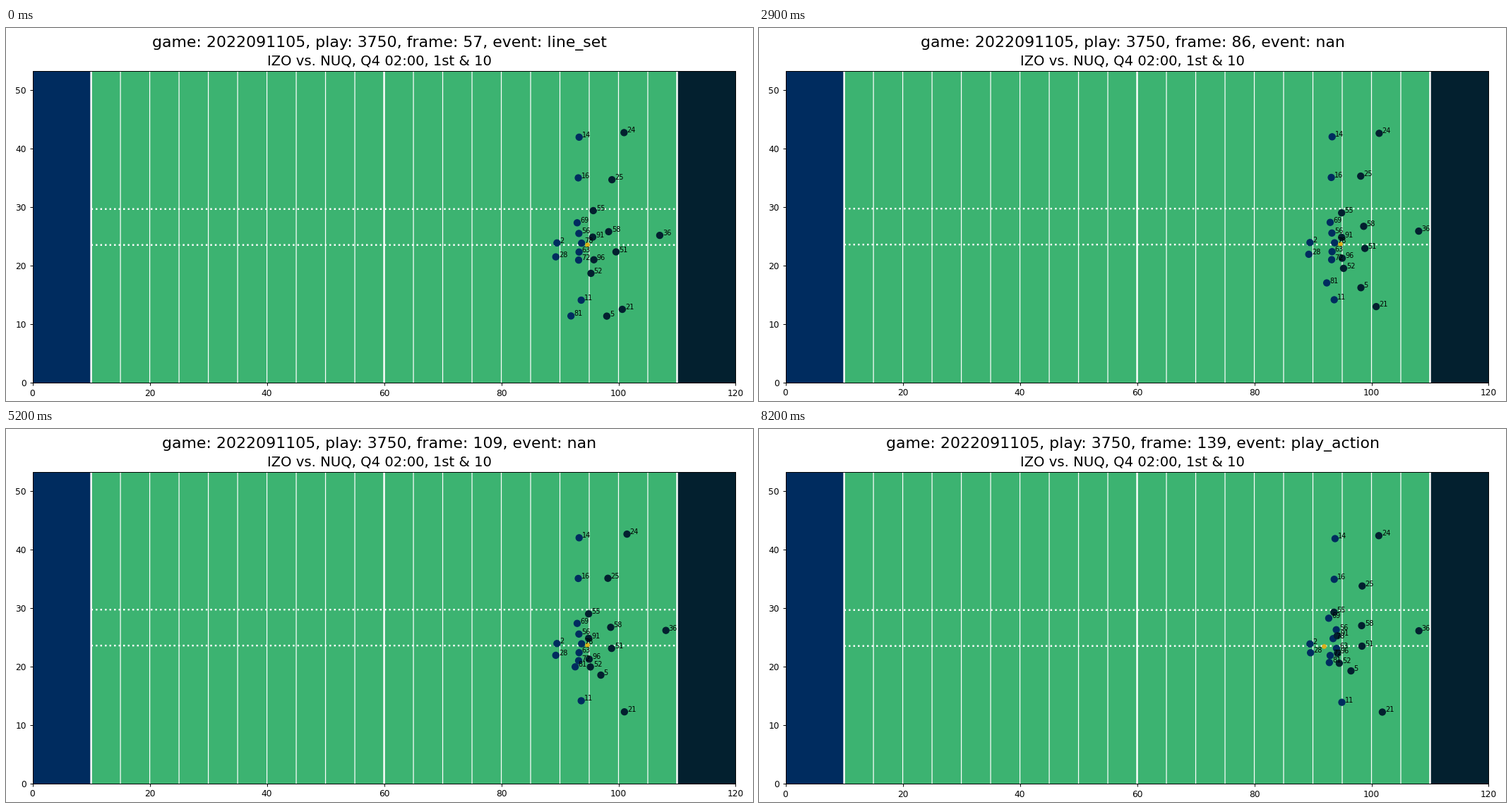
Recreate the animation shown at these times as a matplotlib script. Size 1058 by 529 pixels, loop 8.3 s.

```python
import numpy as np
import matplotlib.pyplot as plt
from matplotlib.animation import FuncAnimation
from matplotlib.patches import Rectangle

W, H = 1058, 529
FRAMES, INTERVAL = 83, 100
FIRST_FRAME = 57
FIELD_LEN, FIELD_WID = 120, 53.3
YARD = 8.299                      # pixels per yard
LEFT = 37.6
HOME, AWAY, GRASS, BALL = "#002c5f", "#03202f", "mediumseagreen", "#dbb01a"
EVENTS = {57: "line_set", 129: "ball_snap", 139: "play_action"}

# Phases of the play in tenths of a second; the loop ends halfway through SNAP.
SETTLE, CREEP, TROT, ADJUST, SNAP = (0, 18), (11, 29), (9, 42), (45, 57), (72, 92)

players = []                      # (number, color, start, moves)


def unit(color, spots, *moves):
    """Players who share the same moves, each move being (phase, dx, dy)."""
    players.extend((num, color, spot, moves) for num, spot in spots.items())


# Offense: tackles and center, guards, receivers, backfield, man in motion
unit(HOME, {69: (92.95, 27.37), 78: (93.70, 23.89), 72: (93.20, 21.00)}, (SNAP, -0.5, 1.9))
unit(HOME, {56: (93.24, 25.55), 63: (93.27, 22.37)}, (SNAP, 1.5, 1.6))
unit(HOME, {14: (93.28, 42.00), 16: (93.14, 35.05)}, (SNAP, 1.0, -0.15))
unit(HOME, {11: (93.64, 14.15)}, (SNAP, 2.6, -0.4))
unit(HOME, {2: (89.50, 23.93)})
unit(HOME, {28: (89.30, 21.55)}, (SETTLE, 0, 0.37), (SNAP, 0.6, 1.0))
unit(HOME, {81: (91.89, 11.45)}, (TROT, 0.72, 8.5), (SNAP, 0.4, 1.6))

# Defense: line, linebackers, secondary, nickel who shadows the motion
unit(AWAY, {55: (95.70, 29.45)}, (CREEP, -0.8, -0.45), (SNAP, -2.6, 0.7))
unit(AWAY, {91: (95.60, 24.92)}, (CREEP, -0.7, -0.1), (SNAP, -1.5, 1.0))
unit(AWAY, {96: (95.80, 21.05)}, (CREEP, -0.8, 0.2), (SNAP, -1.6, 2.2))
unit(AWAY, {52: (95.30, 18.73)}, (TROT, -0.1, 1.2), (SNAP, -1.4, 1.4))
unit(AWAY, {58: (98.32, 25.85)}, (SETTLE, 0.35, 0.85), (SNAP, -0.7, 0.7))
unit(AWAY, {51: (99.57, 22.40)}, (SETTLE, -0.6, 0.2), (TROT, -0.15, 0.5), (SNAP, -0.9, 0.9))
unit(AWAY, {36: (107.04, 25.22)}, (SETTLE, 0.95, 0.1), (TROT, 0.1, 0.85))
unit(AWAY, {24: (100.95, 42.78)}, (SETTLE, 0.1, -0.25), (TROT, 0.4, 0.1), (SNAP, -0.4, -0.4))
unit(AWAY, {25: (98.88, 34.73)}, (SETTLE, -0.72, 0.55), ((45, 75), 0.25, -1.45))
unit(AWAY, {21: (100.65, 12.58)}, (SETTLE, 0.15, 0.4), ((29, 45), -0.35, -0.6),
     (ADJUST, 0.9, -0.2), (SNAP, 1.0, 0.2))
unit(AWAY, {5: (98.00, 11.42)}, (TROT, 0.3, 7.3), (ADJUST, -2.1, -0.3),
     ((59, 72), 0.5, 0.3), (SNAP, -0.4, 1.2))

BALL_START, BALL_MOVES = (94.62, 23.68), ((SNAP, -5.6, -0.15),)


def position(start, moves, t):
    x, y = start
    for (begin, end), dx, dy in moves:
        u = np.clip((t - begin) / (end - begin), 0, 1)
        done = u * u * (3 - 2 * u)
        x, y = x + dx * done, y + dy * done
    return x, y


fig = plt.figure(figsize=(12, 6), dpi=W / 12, facecolor="white")
ax = fig.add_axes([0, 0, 1, 1], facecolor=GRASS)
ax.set(xlim=(0, FIELD_LEN), ylim=(0, FIELD_WID),
       xticks=range(0, 121, 20), yticks=range(0, 51, 10))

for x, color in ((0, HOME), (110, AWAY)):
    ax.add_patch(Rectangle((x, 0), 10, FIELD_WID, color=color, lw=0))
for x in range(10, 111, 5):
    ax.axvline(x, color="white", lw=2 if x in (10, 60, 110) else 1, snap=False)
for y in (23.58, 29.72):
    ax.plot([10, 110], [y, y], color="white", ls=":", lw=2, snap=False)

title = fig.suptitle("", fontsize=18)
fig.text(0.5, 1 - 52.3 / H, "IZO vs. NUQ, Q4 02:00, 1st & 10", fontsize=16, ha="center")

dots = ax.scatter(*np.zeros((2, len(players))), s=55, c=[p[1] for p in players], zorder=3)
labels = [ax.text(0, 0, str(p[0]), fontsize=8, zorder=4) for p in players]
ball = ax.scatter([0], [0], s=20, color=BALL, zorder=3)


def draw(i):
    frame = FIRST_FRAME + i
    event = EVENTS.get(frame, "nan")
    title.set_text(f"game: 2022091105, play: 3750, frame: {frame}, event: {event}")
    # The taller title of a named event pushes the field down slightly.
    base = 503.4 if frame in EVENTS else 502.85
    ax.set_position([LEFT / W, 1 - base / H, FIELD_LEN * YARD / W, FIELD_WID * YARD / H])
    spots = [position(start, moves, i) for _, _, start, moves in players]
    dots.set_offsets(spots)
    for label, (x, y) in zip(labels, spots):
        label.set_position((x + 0.5, y))
    ball.set_offsets([position(BALL_START, BALL_MOVES, i)])
    return []


anim = FuncAnimation(fig, draw, frames=FRAMES, interval=INTERVAL,
                     init_func=lambda: draw(0), repeat=True, repeat_delay=0)
plt.show()
```
